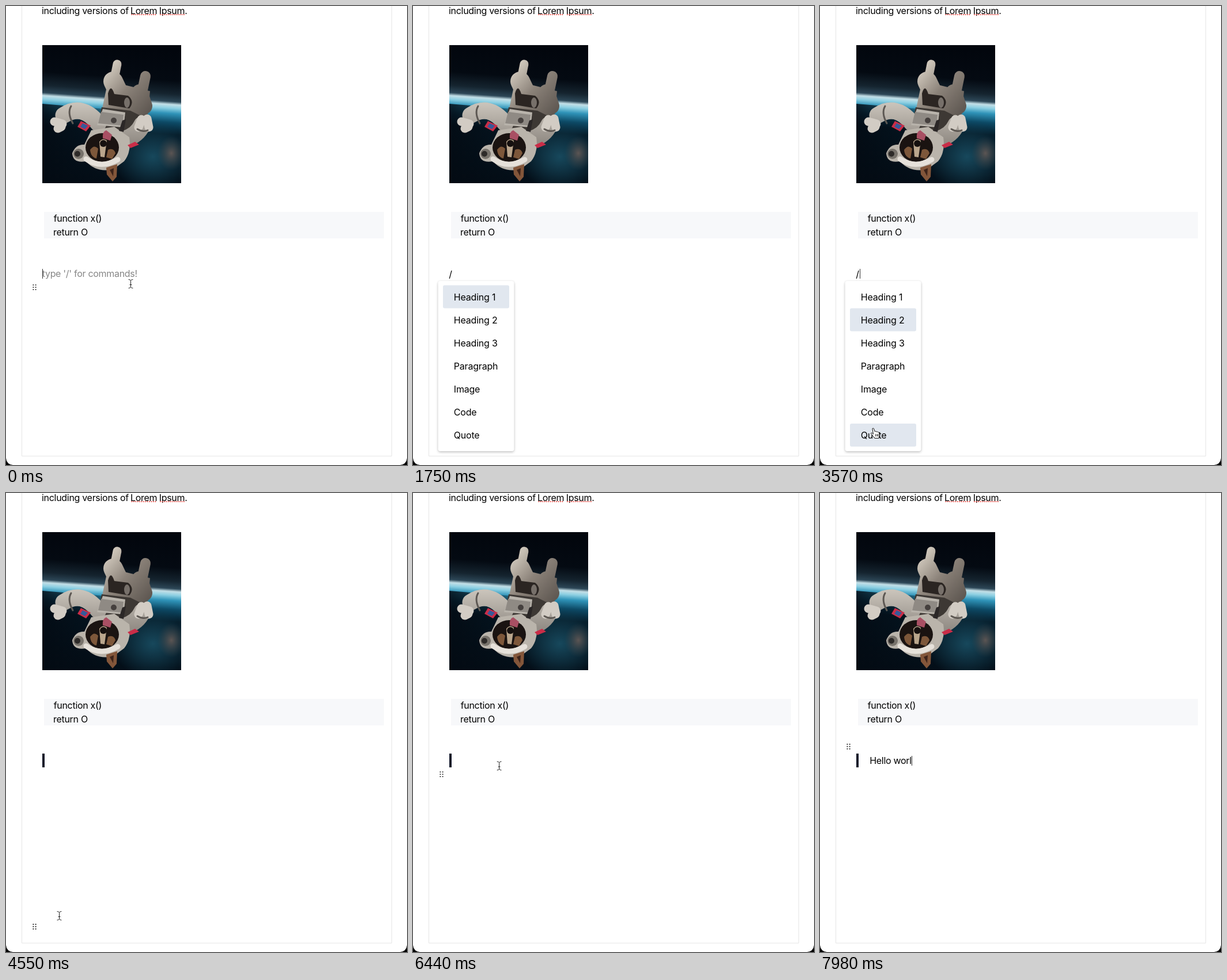
Animation of 696x798 px, one loop 8 s. Source, as an HTML page:

```html
<!DOCTYPE html>
<html lang="en">
<head>
<meta charset="utf-8">
<title>Block editor</title>
<style>
  html, body { margin: 0; width: 100%; height: 100%; overflow: hidden; background: #fff; }
  svg { display: block; }
  text { font: 16px Inter, Roboto, sans-serif; letter-spacing: -.3px; white-space: pre; }
  #menu text { letter-spacing: -.2px; }
  .round { fill: none; stroke-linecap: round; stroke-linejoin: round; }
  #panel { filter: drop-shadow(0 2px 2px rgba(0,0,0,.2)) drop-shadow(0 0 1px rgba(0,0,0,.1)); }
</style>
</head>
<body>
<svg width="696" height="798" viewBox="0 0 696 798">
  <defs>
    <linearGradient id="sky" x1="0" y1="0" x2="0" y2="1">
      <stop offset="0" stop-color="#02060d"/>
      <stop offset=".2" stop-color="#040a12"/>
      <stop offset=".29" stop-color="#15242f"/>
      <stop offset=".34" stop-color="#2c4656"/>
      <stop offset=".36" stop-color="#c3dfe7"/>
      <stop offset=".385" stop-color="#8ccfe2"/>
      <stop offset=".42" stop-color="#2f93b8"/>
      <stop offset=".48" stop-color="#0d4a66"/>
      <stop offset=".56" stop-color="#051a27"/>
      <stop offset="1" stop-color="#030c15"/>
    </linearGradient>
    <linearGradient id="shade">
      <stop offset="0" stop-color="#030a12" stop-opacity=".85"/>
      <stop offset=".7" stop-color="#030a12" stop-opacity="0"/>
    </linearGradient>
    <linearGradient id="suit" gradientUnits="userSpaceOnUse" x1="172" y1="115" x2="250" y2="185">
      <stop offset="0" stop-color="#cfc7bb"/>
      <stop offset=".45" stop-color="#8b8279"/>
      <stop offset="1" stop-color="#5d5650"/>
    </linearGradient>
    <linearGradient id="sleeve" gradientUnits="userSpaceOnUse" x1="0" y1="170" x2="0" y2="235">
      <stop offset="0" stop-color="#c9c3ba"/>
      <stop offset="1" stop-color="#938d86"/>
    </linearGradient>
    <radialGradient id="sea">
      <stop offset="0" stop-color="#17485c"/>
      <stop offset="1" stop-color="#17485c" stop-opacity="0"/>
    </radialGradient>
    <radialGradient id="land">
      <stop offset="0" stop-color="#5c5553"/>
      <stop offset="1" stop-color="#3a4247" stop-opacity="0"/>
    </radialGradient>
    <clipPath id="crop"><path d="M63 68h241v240h-241z"/></clipPath>
  </defs>

  <path d="M27.5 0V782.5H669.5V0" fill="none" stroke="#e6e6e6"/>
  <path d="M0 786Q1 797 12 798H0zM696 786Q695 797 684 798h12z"/>

  <text x="62" y="13.5">including versions of <tspan x="216">Lorem</tspan> <tspan x="265.7">Ipsum.</tspan></text>
  <path class="round" d="M218.5 15H262M268 15H312" stroke="#ee453e" stroke-width="2" stroke-dasharray="0 3.4"/>

  <g clip-path="url(#crop)">
    <path d="M63 68h241v240h-241z" fill="#02060d"/>
    <rect x="40" y="62" width="290" height="260" fill="url(#sky)" transform="rotate(4 63 150)"/>
    <path d="M63 170L304 190V308H63z" fill="url(#shade)"/>
    <ellipse cx="255" cy="262" rx="70" ry="60" fill="url(#sea)"/>
    <ellipse cx="287" cy="256" rx="24" ry="30" fill="url(#land)"/>
    <g class="round" stroke="url(#suit)">
      <path d="M193 101L190 116" stroke-width="15"/>
      <path d="M186 131L195 150" stroke-width="34"/>
      <path d="M242 122L237 146" stroke-width="18"/>
      <path d="M232 150L240 174" stroke-width="28"/>
    </g>
    <path d="M174 145L205 137L250 148L246 188L208 216L164 192z" fill="url(#suit)"/>
    <path d="M177 152q5-18 11 1l24 3q12 10 2 22l-36-6z" fill="#2b2522"/>
    <ellipse cx="210" cy="168" rx="5" ry="9" fill="#77706a"/>
    <path d="M166 176L216 182L232 190L206 222L158 212z" fill="#3d3834"/>
    <g class="round">
      <path d="M160 204Q132 169 100 190" stroke="url(#sleeve)" stroke-width="29"/>
      <path d="M205 232Q228 225 236 207" stroke="url(#sleeve)" stroke-width="30"/>
      <path d="M84 201L98 205M90 213L96 210" stroke="#d2ccc4" stroke-width="15"/>
      <path d="M230 211L235 197M248 211L245 196" stroke="#d2ccc4" stroke-width="15"/>
      <path d="M113 174Q106 186 116 204M228 214Q238 220 246 216" stroke="#5d5853" stroke-width="3"/>
    </g>
    <path d="M148 216L188 210L214 228Q218 254 205 270L186 284Q156 290 139 270Q116 274 115 256Q121 240 136 241z" fill="#bab4ab"/>
    <circle cx="126" cy="257" r="9" fill="#77726b"/>
    <circle cx="124" cy="257" r="5" fill="#2d2a28"/>
    <path d="M168 179L207 185L204 211L158 207z" fill="#b9b4ac"/>
    <path d="M165 184L204 189L202 208L160 204z" fill="#8f8a84"/>
    <circle cx="187" cy="199" r="5" fill="#45403e"/>
    <path d="M202 199l6-2-4 22-8-2z" fill="#2b2727"/>
    <ellipse cx="167" cy="246" rx="29" ry="25" fill="#1a1311"/>
    <path d="M146 250q7-10 14-2l-3 17q-10-2-11-15M177 250q10-4 13 6l-6 10-10-3z" fill="#7d573a"/>
    <path d="M162 236q6-8 13-2l-4 29-7-1z" fill="#baa68d"/>
    <circle cx="169" cy="239" r="6" fill="#15100f"/>
    <path d="M168 230q-1-12 6-14l10 8-3 10z" fill="#a94f63"/>
    <path d="M139 266Q164 284 194 267" class="round" stroke="#e6e1da" stroke-width="9"/>
    <path d="M174 281l19-6-1 22-7 8-10-12z" fill="#83563a"/>
    <path d="M180 285l7-3-1 14z" fill="#3e241a"/>
    <path d="M130 200l17 8-8 10-15-8z" fill="#c92d48"/>
    <path d="M133 204l9 4-5 6-8-4z" fill="#365a9a"/>
    <path d="M211 242l13-6 7 5-15 6z" fill="#c92d48"/>
  </g>

  <path d="M66 358h590v46h-590z" fill="#f7f8fa"/>
  <text x="82.7" y="375">function x()</text>
  <text x="82" y="399">return O</text>

  <text id="hint" x="62.7" y="471.3" fill="#868686">type '/' for commands!</text>
  <text id="slash" x="62.3" y="472">/</text>
  <g id="quote">
    <path d="M63 453h4v24h-4z" fill="#0d1328"/>
    <text id="typed" x="86.2" y="471.3"></text>
  </g>
  <path id="caret" d="M.5 457v17" stroke="#333"/>
  <g id="handle" fill="#333"></g>

  <g id="menu">
    <rect id="panel" x="43.5" y="478" width="132" height="296" rx="4" fill="#fff"/>
  </g>

  <path id="beam" class="round" d="M-4-7.5Q-1-7.5-.5-5.5Q0-7.5 3-7.5M-.5-5.5V5.5M-4 7.5Q-1 7.5-.5 5.5Q0 7.5 3 7.5M-2 1.5H1" stroke="#222"/>
  <path id="hand" d="M-1 .5q1.5-1.5 2.6 0l1.6 5q2-1.2 2.8.5q1.8-.9 2.6.6q1.7-.4 2.2 1.2l.6 4q.1 2-.9 3.2l-.3 2.2h-7l-4-5q-1.8-2.4-2.8-3.2q.4-2 2.6-.6l1.6 1.6z M4.5 10v4M7 10v4M9 10v4" fill="#fff" stroke="#111" stroke-linejoin="round"/>
</svg>
<script>
const LOOP = 8000, STEP = 70;
const OPEN = 210, ARROW_DOWN = 2170, POINT = 2450, PICK = 4200, FOCUS = 6580, TYPE = 6860;
const ROW_TOP = 485.5, ROW = 40.1;
const labels = ['Heading 1', 'Heading 2', 'Heading 3', 'Paragraph', 'Image', 'Code', 'Quote'];

// Pointer path: time, x, y
const path = [
  [0, 217, 483], [POINT, 217, 483], [2660, 85, 625], [2800, 63, 655], [3220, 90, 733],
  [3780, 93, 735], [4550, 93, 735], [4970, 122, 566], [5600, 151, 499], [6100, 151, 499],
  [6500, 150, 470], [6720, 150, 432], [LOOP, 150, 432]
];
// Time of each keystroke
const phrase = 'Hello worl';
const keys = [TYPE, 7000, 7140, 7210, 7420, 7560, 7630, 7770, 7840, 7910];

const $ = id => document.getElementById(id);
const show = (id, on) => { $(id).style.display = on ? '' : 'none'; };
const place = (id, x, y) => $(id).setAttribute('transform', `translate(${x} ${y})`);

function add(parent, tag, attrs, text = '') {
  const node = document.createElementNS('http://www.w3.org/2000/svg', tag);
  for (const name in attrs) node.setAttribute(name, attrs[name]);
  node.textContent = text;
  return parent.appendChild(node);
}

const rows = labels.map((label, i) => {
  const y = ROW_TOP + i * ROW;
  const back = add($('menu'), 'rect', { x: 52, y, width: 115, height: 40, rx: 3, fill: '#e1e7ef' });
  add($('menu'), 'text', { x: 70.8, y: y + 26 }, label);
  return back;
});
for (let i = 0; i < 6; i++) {
  add($('handle'), 'circle', { cx: i % 2 ? 51.6 : 47.4, cy: 4 * (i >> 1) - 4, r: 1.1 });
}

function pointer(t) {
  const i = Math.max(1, path.findIndex(p => p[0] >= t));
  const [t0, x0, y0] = path[i - 1], [t1, x1, y1] = path[i];
  const k = Math.max(0, (t - t0) / (t1 - t0));
  return [x0 + (x1 - x0) * k, y0 + (y1 - y0) * k];
}

function draw(t) {
  const open = t >= OPEN && t < PICK, quoting = t >= PICK;
  const [x, y] = pointer(t);
  const visible = t < OPEN || (t >= POINT && t < TYPE);
  const overMenu = open && x < 176;

  show('hint', t < OPEN);
  show('slash', open);
  show('menu', open);
  show('quote', quoting);
  show('handle', !open);
  show('beam', visible && !overMenu);
  show('hand', visible && overMenu);
  place('beam', x, y);
  place('hand', x, y);
  // The handle snaps to the text line under the pointer
  place('handle', 0, 489 + 24.08 * Math.ceil((y - 484) / 24));

  const [hx, hy] = pointer(t - STEP);
  const hovered = t > POINT && hx < 167 ? Math.floor((hy - ROW_TOP) / ROW) : -1;
  const selected = t < ARROW_DOWN ? 0 : 1;
  rows.forEach((row, i) => row.setAttribute('fill-opacity', i === selected || i === hovered ? 1 : 0));

  $('typed').textContent = phrase.slice(0, keys.filter(k => k <= t).length);
  const blink = (t - OPEN) % 1000 < 500;
  show('caret', t < OPEN || (open && blink) || t >= FOCUS);
  const typedWidth = quoting && t >= TYPE ? $('typed').getComputedTextLength() : 0;
  place('caret', quoting ? Math.round(86.4 + typedWidth) : open ? 69 : 63, 0);
}

function tick(now) {
  draw(Math.floor(now % LOOP / STEP) * STEP);
  requestAnimationFrame(tick);
}
draw(0);
requestAnimationFrame(tick);
</script>
</body>
</html>
```
